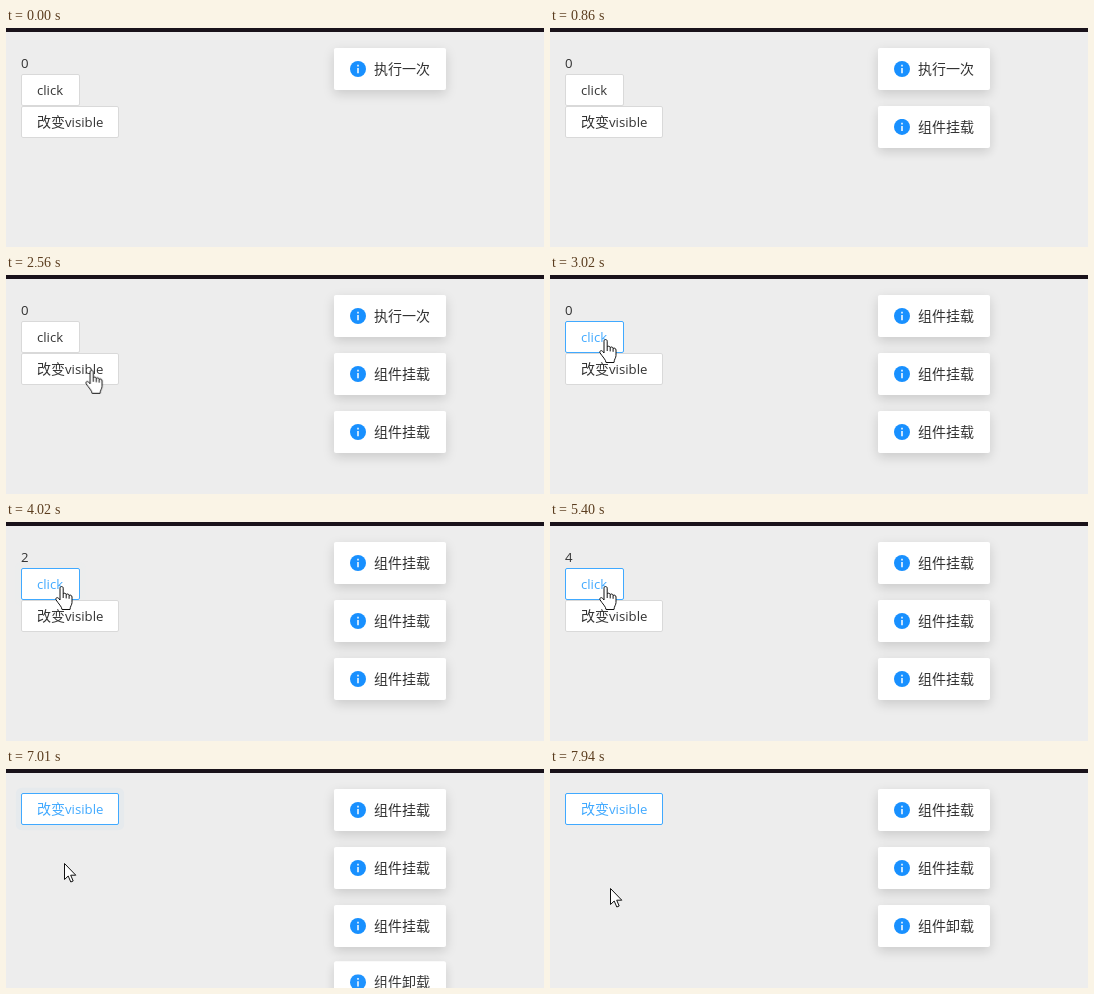
An HTML page that plays this animation: 538 px wide and 219 px high, repeating every 8 s.

```html
<!DOCTYPE html>
<html lang="zh-CN">
<head>
<meta charset="utf-8">
<title>Message demo</title>
<style>
  * { box-sizing: border-box; }
  html, body { margin: 0; width: 100%; height: 100%; overflow: hidden; }
  body {
    position: relative;
    background: #ededed;
    color: #333;
    font: 14px/22px 'Open Sans', 'Noto Sans CJK SC', 'Noto Sans CJK', sans-serif;
  }
  .bar { position: absolute; inset: 0 0 auto; height: 4px; background: #19121a; }
  .latin { font-size: 13.2px; }
  .count span { position: absolute; left: 15px; top: 24px; }
  .button {
    position: absolute;
    left: 15px;
    height: 32px;
    padding-left: 15px;
    border: 1px solid #d9d9d9;
    border-radius: 2px;
    background: #fff;
    line-height: 30px;
    white-space: nowrap;
  }
  .wave { position: absolute; inset: -1px; border-radius: 2px; opacity: 0; }
  #click { top: 46px; width: 59px; }
  #toggle { top: 78px; width: 98px; }
  #messages { position: absolute; left: 230px; top: 12px; width: 308px; }
  .toast {
    display: flex;
    align-items: center;
    gap: 8px;
    width: 112px;
    height: 42px;
    margin: 0 auto;
    padding: 0 16px;
    border-radius: 2px;
    background: #fff;
    box-shadow: 0 4px 12px rgba(0, 0, 0, .15);
    white-space: nowrap;
  }
  .toast svg { flex: none; }
  #cursor { position: absolute; left: 0; top: 0; }
  #cursor svg { position: absolute; overflow: visible; fill: #fff; stroke: #111; stroke-linejoin: round; }
  #hand { left: -6px; top: 0; }
  #arrow { left: 0; top: 0; }
</style>
</head>
<body>
<div class="bar"></div>
<div id="counter">
  <div class="count latin"></div>
  <div class="button" id="click"><span class="latin">click</span><div class="wave"></div></div>
</div>
<div class="button" id="toggle">改变<span class="latin">visible</span><div class="wave"></div></div>
<div id="messages"></div>
<div id="cursor">
  <svg id="arrow" width="12" height="20"><path d="M.5 .5V16.5L4.2 13L6.8 19L9.2 18L6.7 12.2H11.8Z"/></svg>
  <svg id="hand" width="18" height="24">
    <path d="M5 14V2.2C5 0 8.2 0 8.2 2.2V8C8.5 6.8 11 6.9 11.2 8.6C11.8 7.5 14 7.8 14.1 9.5C15 8.6 17 9.2 17 11V16.5C17 19 15.2 20 15 23.5H7C6.8 20.5 3.6 18 1 13.8C.2 12 2.4 10.8 3.6 12.3Z"/>
    <path d="M8.2 8V12M11.2 8.6V12.4M14.1 9.5V12.8" fill="none"/>
  </svg>
</div>
<script>
const LOOP = 8000;
const EASE_OUT = 'cubic-bezier(.08,.82,.17,1)';
const EASE_IN = 'cubic-bezier(.6,.04,.98,.34)';
const EASE_IN_OUT = 'cubic-bezier(.645,.045,.355,1)';
const BLUE = '#40a9ff';
const UNMOUNT = 6900;
const CLICKS = [3160, 3720, 4290, 4850];
const origin = document.timeline.currentTime ?? 0;
const $ = selector => document.querySelector(selector);

// Each step is [time in ms, properties, easing towards the next step].
function play(el, steps) {
  const all = [[0, steps[0][1]], ...steps, [LOOP, steps.at(-1)[1]]];
  const frames = all.map(([ms, props, easing = 'linear']) => ({ ...props, easing, offset: ms / LOOP }));
  el.animate(frames, { duration: LOOP, iterations: Infinity }).startTime = origin;
}

function show(el, from, to = LOOP) {
  const hidden = { opacity: 0 }, shown = { opacity: 1 };
  play(el, [[from, hidden], [from, shown], [to, shown], [to, to < LOOP ? hidden : shown]]);
}

function toast(text, enter, leave) {
  const notice = document.createElement('div');
  notice.innerHTML = `<div class="toast"><svg width="16" height="16">
    <circle cx="8" cy="8" r="8" fill="#1890ff"/>
    <path d="M8 3.8v1.7M8 7v5.2" stroke="#fff" stroke-width="1.5"/></svg>${text}</div>`;
  $('#messages').append(notice);

  const on = { maxHeight: '150px', padding: '8px', opacity: 1, overflow: 'visible', transform: 'translateY(0)' };
  const off = { ...on, maxHeight: '0px', padding: '0px', opacity: 0, overflow: 'hidden' };
  const above = { ...on, opacity: 0, transform: 'translateY(-100%)' };
  const steps = enter > 0 ? [[enter, off], [enter, above, EASE_OUT], [enter + 200, on]] : [[0, on]];
  if (leave < LOOP) {
    steps.push([leave, on], [leave, { ...on, overflow: 'hidden' }, EASE_IN], [leave + 300, off]);
  }
  play(notice, steps);
}

function hover(button, start) {
  play(button, [
    [start, { color: '#333', borderColor: '#d9d9d9' }, EASE_IN_OUT],
    [start + 300, { color: BLUE, borderColor: BLUE }]
  ]);
}

function wave(button, times) {
  const el = button.querySelector('.wave');
  const ring = size => `0 0 0 ${size}px ${BLUE}`;
  const idle = { boxShadow: ring(0) };
  play(el, [[times[0], idle], ...times.flatMap(t =>
    [[t, idle, EASE_OUT], [t + 400, { boxShadow: ring(6) }]])]);
  play(el, [[times[0], { opacity: 0 }], ...times.flatMap((t, i) => {
    const end = Math.min(t + 500, times[i + 1] ?? LOOP);
    return [[t, { opacity: .2 }, EASE_OUT], [end, { opacity: 0 }]];
  })]);
}

// One message per tick; each stays for three ticks.
const FIRST = 690, TICK = 985;
for (let i = -1; i < 7; i++) {
  const enter = FIRST + i * TICK;
  toast(i < 0 ? '执行一次' : '组件挂载', enter, enter + 3 * TICK);
}
toast('组件卸载', UNMOUNT, LOOP);

[0, ...CLICKS].forEach((time, n, times) => {
  const digit = document.createElement('span');
  digit.textContent = n;
  $('.count').append(digit);
  show(digit, time, times[n + 1]);
});

hover($('#click'), 2620);
hover($('#toggle'), 6110);
wave($('#click'), CLICKS);
wave($('#toggle'), [UNMOUNT]);

play($('#counter'), [[UNMOUNT, { opacity: 1 }], [UNMOUNT, { opacity: 0 }]]);
play($('#toggle'), [
  [UNMOUNT, { transform: 'translateY(0)' }],
  [UNMOUNT, { transform: 'translateY(-54px)' }]
]);

const path = [
  [1170, 214, 222], [1710, 180, 193], [1940, 140, 150], [2480, 98, 108],
  [2750, 55, 64], [5980, 55, 64], [6240, 58, 94], [7480, 58, 94], [7900, 60, 119]
];
play($('#cursor'), path.map(([ms, x, y]) => [ms, { transform: `translate(${x}px, ${y}px)` }]));
show($('#hand'), 2480, UNMOUNT);
play($('#arrow'), [
  [2480, { opacity: 1 }], [2480, { opacity: 0 }],
  [UNMOUNT, { opacity: 0 }], [UNMOUNT, { opacity: 1 }]
]);
</script>
</body>
</html>
```
